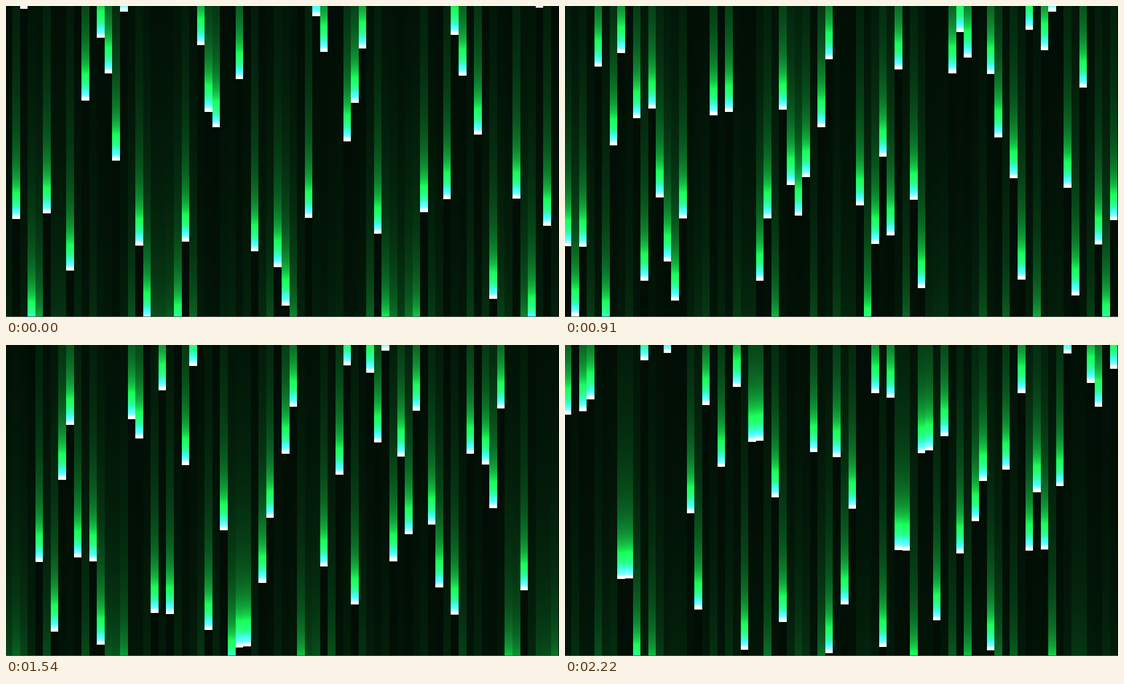
Write an HTML page with a canvas that moves like this. It is 975 px wide and 549 px high and loops after 2.3 s.

```html
<!DOCTYPE html>
<html lang="en">
<head>
<meta charset="utf-8">
<title>Digital rain</title>
<style>
  html, body { margin: 0; width: 100%; height: 100%; overflow: hidden; background: #000; }
  canvas { display: block; }
</style>
</head>
<body>
<canvas id="stage" width="975" height="549"></canvas>
<script>
const WIDTH = 975, HEIGHT = 549, RAIN_HEIGHT = 548;
const COLUMNS = 72, PITCH = 13.57, LEFT = -2.57;
const WRAP = 917.5;              // height of one full rain cycle in px
const LOOP = 2300, STEPS = 30;
const START = 0.3995, TICK = 0.00829;
const TINT = [0.1, 1, 0.35];

const ctx = document.getElementById('stage').getContext('2d');
ctx.imageSmoothingEnabled = false;

// One pixel per column; stretched sideways when drawn
const strip = document.createElement('canvas');
strip.width = COLUMNS;
strip.height = RAIN_HEIGHT;
const stripCtx = strip.getContext('2d');
const image = stripCtx.createImageData(COLUMNS, RAIN_HEIGHT);

const fract = v => v - Math.floor(v);

function stepAt(ms) {
  return Math.min(STEPS - 1, Math.floor((ms + 11) * STEPS / LOOP));
}

// The rain advances in whole ticks, about 4.74 per step
function rainTime(step) {
  return START + TICK * Math.max(0, Math.floor(4.74 * step - 0.4));
}

function paint(step) {
  const time = rainTime(step);
  const data = image.data;
  for (let col = 0; col < COLUMNS; col++) {
    const speed = 0.7 + 0.3 * Math.cos(col * 3);
    const shift = time * speed + Math.sin(col * 15);
    for (let y = 0; y < RAIN_HEIGHT; y++) {
      const behind = fract((HEIGHT - y - 0.5) / WRAP + shift);
      const glow = 255 / (20 * behind + 1e-6);
      const i = (y * COLUMNS + col) * 4;
      for (let c = 0; c < 3; c++) data[i + c] = TINT[c] * glow;
      data[i + 3] = 255;
    }
  }
  stripCtx.putImageData(image, 0, 0);
  ctx.drawImage(strip, LEFT, 0, COLUMNS * PITCH, RAIN_HEIGHT);
  ctx.fillStyle = '#5a555c';
  ctx.fillRect(0, RAIN_HEIGHT, WIDTH, HEIGHT - RAIN_HEIGHT);
}

let shown = -1;
function update() {
  const step = stepAt(performance.now() % LOOP);
  if (step !== shown) paint(shown = step);
  requestAnimationFrame(update);
}
update();
</script>
</body>
</html>
```
